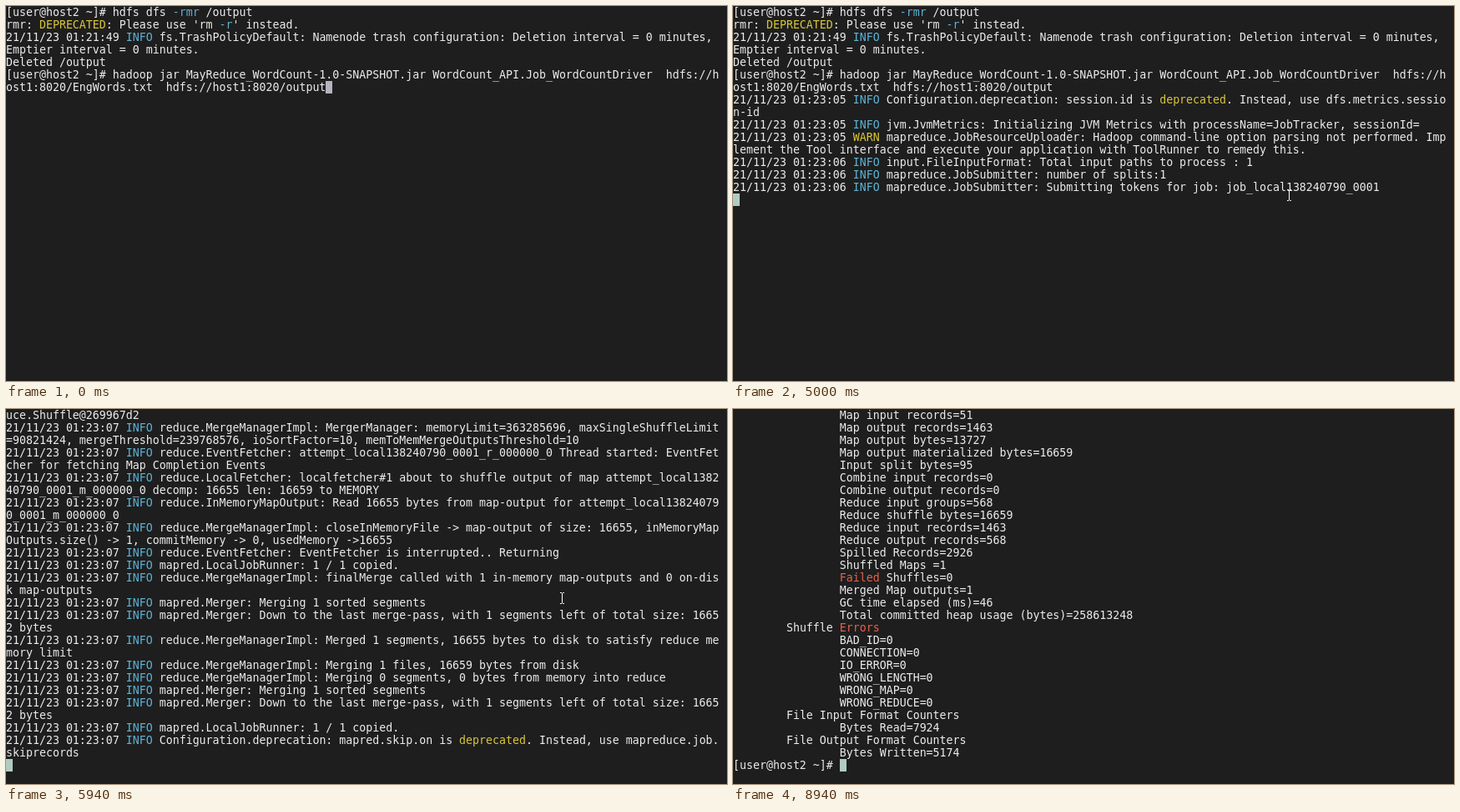
Write an HTML page that moves like this. It is 864 by 450 pixels and loops after 9890 ms.

```html
<!DOCTYPE html>
<html lang="en">
<head>
<meta charset="utf-8">
<title>Word count job</title>
<style>
html, body { margin: 0; width: 100%; height: 100%; overflow: hidden; background: #1e1e1e; }
#screen { position: absolute; left: 0; top: 0; width: 864px; height: 435px; overflow: hidden; }
/* Short text sits at the top; long text is pinned to the bottom, like a scrolling terminal. */
#log {
  position: absolute; left: 0; bottom: 0; width: 860px; min-height: 435px; margin: 0;
  font: 13.288px/15px "DejaVu Sans Mono", monospace; font-variant-ligatures: none;
  color: #ececec; white-space: break-spaces; line-break: anywhere; tab-size: 8;
}
#log b { font-weight: normal; }
.blue { color: #5cb3d6; }
.gold { color: #d9c63a; }
.red { color: #e8604c; }
.caret { display: inline-block; width: 8px; height: 15px; vertical-align: top; }
svg { position: absolute; left: 0; top: 0; }
</style>
</head>
<body>
<div id="screen"><pre id="log"></pre></div>
<svg width="864" height="450">
  <g id="beam">
    <circle id="click" r="12" fill="#ff0" fill-opacity=".47"/>
    <path d="M-2-6.5H0M1-6.5H3M.5-6V6M-2 6.5H0M1 6.5H3" stroke="#fff" fill="none"/>
  </g>
  <path id="arrow" d="M.5.5V16.5L4 13L6.5 18.5L9 17.5L6.5 12H11.5Z" fill="#fff" stroke="#000"/>
</svg>
<script>
const LOOP = 9890, TICK = 1000 / 15;
const id = "local138240790_0001", job = "job_" + id;
const mapTask = `attempt_${id}_m_000000_0`, redTask = `attempt_${id}_r_000000_0`;

// A leading digit stands for the time stamp ending in that second.
const lines = `[user@host2 ~]# hdfs dfs -rmr /output
rmr: DEPRECATED: Please use 'rm -r' instead.
21/11/23 01:21:49 INFO fs.TrashPolicyDefault: Namenode trash configuration: Deletion interval = 0 minutes, Emptier interval = 0 minutes.
Deleted /output
[user@host2 ~]# hadoop jar MayReduce_WordCount-1.0-SNAPSHOT.jar WordCount_API.Job_WordCountDriver  hdfs://host1:8020/EngWords.txt  hdfs://host1:8020/output
5 Configuration.deprecation: session.id is deprecated. Instead, use dfs.metrics.session-id
5 jvm.JvmMetrics: Initializing JVM Metrics with processName=JobTracker, sessionId=
21/11/23 01:23:05 WARN mapreduce.JobResourceUploader: Hadoop command-line option parsing not performed. Implement the Tool interface and execute your application with ToolRunner to remedy this.
6 input.FileInputFormat: Total input paths to process : 1
6 mapreduce.JobSubmitter: number of splits:1
6 mapreduce.JobSubmitter: Submitting tokens for job: ${job}
6 mapreduce.Job: The url to track the job: http://localhost:8080/
6 mapreduce.Job: Running job: ${job}
6 mapred.LocalJobRunner: OutputCommitter set in config null
6 output.FileOutputCommitter: File Output Committer Algorithm version is 1
6 mapred.LocalJobRunner: OutputCommitter is org.apache.hadoop.mapreduce.lib.output.FileOutputCommitter
6 mapred.LocalJobRunner: Waiting for map tasks
6 mapred.LocalJobRunner: Starting task: ${mapTask}
6 output.FileOutputCommitter: File Output Committer Algorithm version is 1
6 mapred.Task:  Using ResourceCalculatorProcessTree : [ ]
6 mapred.MapTask: Processing split: hdfs://host1:8020/EngWords.txt:0+7924
6 mapred.MapTask: (EQUATOR) 0 kvi 26214396(104857584)
6 mapred.MapTask: mapreduce.task.io.sort.mb: 100
6 mapred.MapTask: soft limit at 83886080
6 mapred.MapTask: bufstart = 0; bufvoid = 104857600
6 mapred.MapTask: kvstart = 26214396; length = 6553600
6 mapred.MapTask: Map output collector class = org.apache.hadoop.mapred.MapTask$MapOutputBuffer
6 mapred.LocalJobRunner:
6 mapred.MapTask: Starting flush of map output
6 mapred.MapTask: Spilling map output
6 mapred.MapTask: bufstart = 0; bufend = 13727; bufvoid = 104857600
6 mapred.MapTask: kvstart = 26214396(104857584); kvend = 26208548(104834192); length = 5849/6553600
6 mapred.MapTask: Finished spill 0
6 mapred.Task: Task:${mapTask} is done. And is in the process of committing
6 mapred.LocalJobRunner: map
6 mapred.Task: Task '${mapTask}' done.
6 mapred.LocalJobRunner: Finishing task: ${mapTask}
6 mapred.LocalJobRunner: map task executor complete.
6 mapred.LocalJobRunner: Waiting for reduce tasks
6 mapred.LocalJobRunner: Starting task: ${redTask}
7 output.FileOutputCommitter: File Output Committer Algorithm version is 1
7 mapred.Task:  Using ResourceCalculatorProcessTree : [ ]
7 mapred.ReduceTask: Using ShuffleConsumerPlugin: org.apache.hadoop.mapreduce.task.reduce.Shuffle@269967d2
7 reduce.MergeManagerImpl: MergerManager: memoryLimit=363285696, maxSingleShuffleLimit=90821424, mergeThreshold=239768576, ioSortFactor=10, memToMemMergeOutputsThreshold=10
7 reduce.EventFetcher: ${redTask} Thread started: EventFetcher for fetching Map Completion Events
7 reduce.LocalFetcher: localfetcher#1 about to shuffle output of map ${mapTask} decomp: 16655 len: 16659 to MEMORY
7 reduce.InMemoryMapOutput: Read 16655 bytes from map-output for ${mapTask}
7 reduce.MergeManagerImpl: closeInMemoryFile -> map-output of size: 16655, inMemoryMapOutputs.size() -> 1, commitMemory -> 0, usedMemory ->16655
7 reduce.EventFetcher: EventFetcher is interrupted.. Returning
7 mapred.LocalJobRunner: 1 / 1 copied.
7 reduce.MergeManagerImpl: finalMerge called with 1 in-memory map-outputs and 0 on-disk map-outputs
7 mapred.Merger: Merging 1 sorted segments
7 mapred.Merger: Down to the last merge-pass, with 1 segments left of total size: 16652 bytes
7 reduce.MergeManagerImpl: Merged 1 segments, 16655 bytes to disk to satisfy reduce memory limit
7 reduce.MergeManagerImpl: Merging 1 files, 16659 bytes from disk
7 reduce.MergeManagerImpl: Merging 0 segments, 0 bytes from memory into reduce
7 mapred.Merger: Merging 1 sorted segments
7 mapred.Merger: Down to the last merge-pass, with 1 segments left of total size: 16652 bytes
7 mapred.LocalJobRunner: 1 / 1 copied.
7 Configuration.deprecation: mapred.skip.on is deprecated. Instead, use mapreduce.job.skiprecords
7 mapred.Task: Task:${redTask} is done. And is in the process of committing
7 mapred.LocalJobRunner: 1 / 1 copied.
7 mapred.Task: Task ${redTask} is allowed to commit now
7 output.FileOutputCommitter: Saved output of task '${redTask}' to hdfs://host1:8020/output/_temporary/0/task_${id}_r_000000
7 mapred.LocalJobRunner: reduce > reduce
7 mapred.Task: Task '${redTask}' done.
7 mapred.LocalJobRunner: Finishing task: ${redTask}
7 mapred.LocalJobRunner: reduce task executor complete.
7 mapreduce.Job: Job ${job} running in uber mode : false
7 mapreduce.Job:  map 100% reduce 100%
7 mapreduce.Job: Job ${job} completed successfully
7 mapreduce.Job: Counters: 35
\tFile System Counters
\t\tFILE: Number of bytes read=49690
\t\tFILE: Number of bytes written=633871
\t\tFILE: Number of read operations=0
\t\tFILE: Number of large read operations=0
\t\tFILE: Number of write operations=0
\t\tHDFS: Number of bytes read=15848
\t\tHDFS: Number of bytes written=5174
\t\tHDFS: Number of read operations=13
\t\tHDFS: Number of large read operations=0
\t\tHDFS: Number of write operations=4
\tMap-Reduce Framework
\t\tMap input records=51
\t\tMap output records=1463
\t\tMap output bytes=13727
\t\tMap output materialized bytes=16659
\t\tInput split bytes=95
\t\tCombine input records=0
\t\tCombine output records=0
\t\tReduce input groups=568
\t\tReduce shuffle bytes=16659
\t\tReduce input records=1463
\t\tReduce output records=568
\t\tSpilled Records=2926
\t\tShuffled Maps =1
\t\tFailed Shuffles=0
\t\tMerged Map outputs=1
\t\tGC time elapsed (ms)=46
\t\tTotal committed heap usage (bytes)=258613248
\tShuffle Errors
\t\tBAD_ID=0
\t\tCONNECTION=0
\t\tIO_ERROR=0
\t\tWRONG_LENGTH=0
\t\tWRONG_MAP=0
\t\tWRONG_REDUCE=0
\tFile Input Format Counters
\t\tBytes Read=7924
\tFile Output Format Counters
\t\tBytes Written=5174
[user@host2 ~]# `.split("\n").map(paint);

// [time in ms, number of lines printed by then]
const prints = [[0, 5], [4260, 7], [4660, 8], [4730, 9], [4800, 10], [5000, 11],
  [5200, 14], [5260, 16], [5330, 20], [5460, 27], [5590, 33], [5660, 39],
  [5730, 44], [5800, 51], [5940, 60], [6140, 68], [6210, 92],
  [7220, lines.length - 1], [7680, lines.length]];

function paint(line) {
  return line
    .replace(/^(\d) /, "21/11/23 01:23:0$1 INFO ")
    .replace(/\b(INFO|Starting)\b| -r(mr)?\b/g, '<b class="blue">$&</b>')
    .replace(/WARN|\bdeprecated\b|\$MapOutputBuffer/gi, '<b class="gold">$&</b>')
    .replace(/Failed|Errors/g, '<b class="red">$&</b>')
    .replace("http://localhost", "<u>$&</u>");
}

const find = name => document.getElementById(name);
const log = find("log"), beam = find("beam"), click = find("click"), arrow = find("arrow");
let shown = "";

function drawLog(t) {
  const count = prints.findLast(([start]) => t >= start)[1];
  const atPrompt = t < 2130 || count === lines.length;
  const caret = `<span class="caret" style="background:${t < 4260 ? "#b4b4c0" : "#b0cbc0"}"></span>`;
  const html = lines.slice(0, count).join("\n") + (atPrompt ? "" : "\n") + caret;
  if (html !== shown) log.innerHTML = shown = html;
}

function place(shape, point) {
  shape.style.display = point ? "" : "none";
  if (point) shape.setAttribute("transform", `translate(${point.map(Math.round)})`);
}

function beamAt(t) {
  if (t < 70 || t >= 8600) return null;
  if (t >= 8530) return [849, 353];
  if (t >= 8460) return [735, 273];
  const step = Math.min(6, Math.floor((t - 70) / TICK));
  const left = (1 - step / 6) ** 2;
  return [666 + 124 * left, 227 + 163 * left];
}

function arrowAt(t) {
  if (t < 8800 || t >= 8940) return null;
  return t < 8870 ? [830, 422] : [845, 434];
}

function frame() {
  const t = performance.now() % LOOP;
  drawLog(t);
  place(beam, beamAt(t));
  place(arrow, arrowAt(t));
  click.style.display = t >= 740 && t < 870 ? "" : "none";
  requestAnimationFrame(frame);
}
frame();
</script>
</body>
</html>
```
